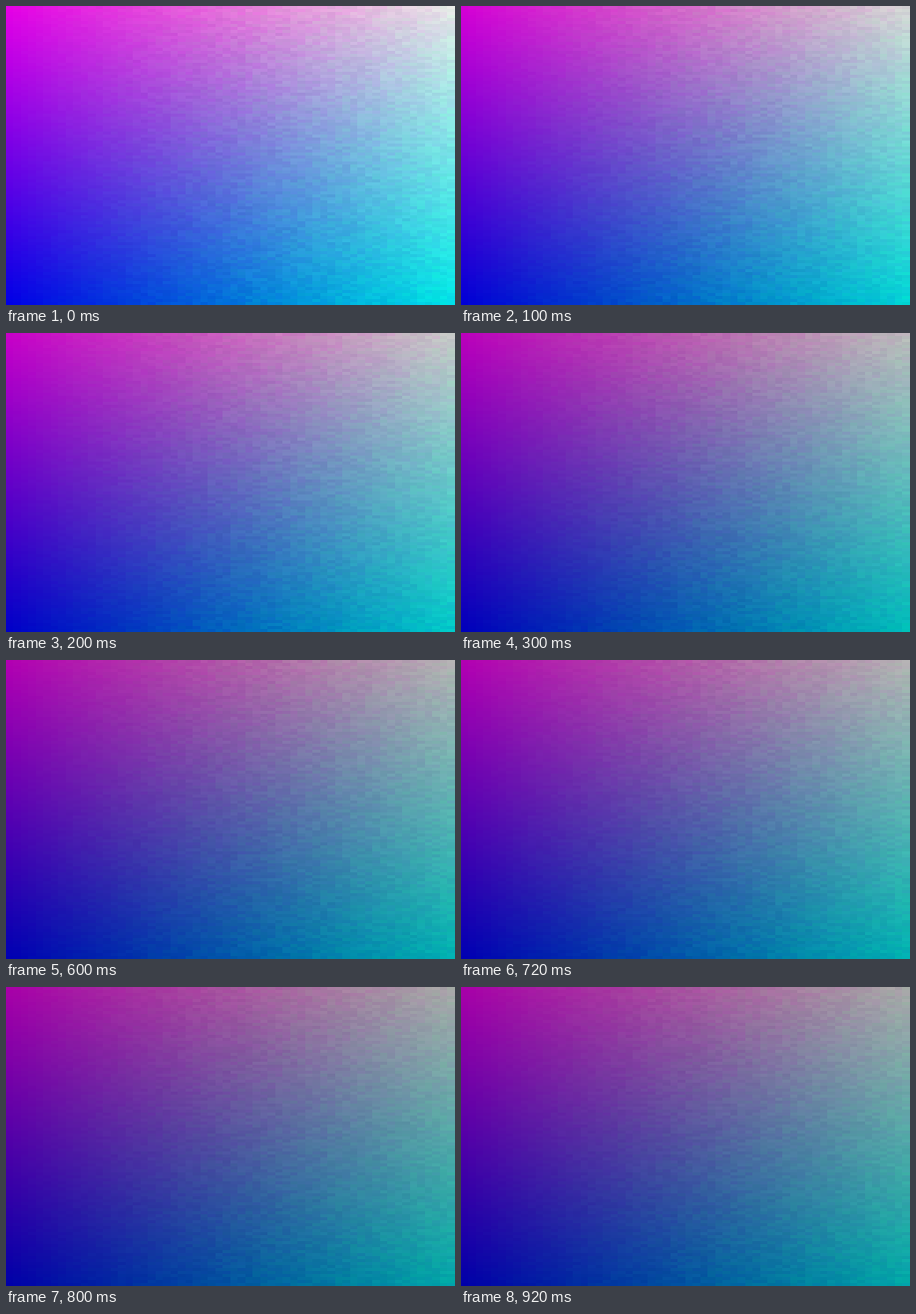
Write an HTML page with a canvas that moves like this. It is 450 px wide and 300 px high and loops after 1 s.

```html
<!DOCTYPE html>
<html>
<head>
<meta charset="utf-8">
<style>
html, body { margin: 0; width: 100%; height: 100%; overflow: hidden; background: #000; }
canvas { display: block; width: 450px; height: 300px; }
</style>
</head>
<body>
<canvas id="stage" width="450" height="300"></canvas>
<script>
const ctx = document.getElementById('stage').getContext('2d');
const W = 450, H = 300, COLS = 60, ROWS = 100, LOOP = 1000;

// start time in ms, peak channel level
const steps = [
  [0, 230], [100, 213], [200, 200], [300, 187], [600, 178], [800, 168]
];

function seeded(seed) {
  return () => {
    seed = (seed + 0x6D2B79F5) | 0;
    let t = Math.imul(seed ^ (seed >>> 15), 1 | seed);
    t = (t + Math.imul(t ^ (t >>> 7), 61 | t)) ^ t;
    return ((t ^ (t >>> 14)) >>> 0) / 4294967296;
  };
}

// Red fades downward, green grows rightward, blue stays full;
// the grain gets stronger towards the right.
function paint(index) {
  const level = steps[index][1];
  const rand = seeded(71 + index * 101);
  const cw = W / COLS, ch = H / ROWS;
  for (let row = 0; row < ROWS; row++) {
    const v = row / (ROWS - 1);
    for (let col = 0; col < COLS; col++) {
      const u = col / (COLS - 1);
      const grain = (rand() - 0.5) * 0.09 * Math.min(1, 0.12 + u * 1.5);
      const tint = (rand() - 0.5) * 0.04 * Math.min(1, u * 2);
      const r = level * Math.max(0, (1 - v) * (1 + tint) + tint * 0.5);
      const g = level * Math.max(0, u + grain);
      const b = level * (1 - 0.05 * Math.sin(Math.PI * u) + tint);
      const x = Math.floor(col * cw), y = row * ch;
      ctx.fillStyle = `rgb(${Math.round(r)},${Math.round(g)},${Math.round(b)})`;
      ctx.fillRect(x, y, Math.floor((col + 1) * cw) - x, ch);
    }
  }
}

let shown = -1;
function draw() {
  const time = performance.now() % LOOP;
  let index = 0;
  while (index + 1 < steps.length && time >= steps[index + 1][0]) index++;
  if (index !== shown) {
    paint(index);
    shown = index;
  }
  requestAnimationFrame(draw);
}
draw();
</script>
</body>
</html>
```
